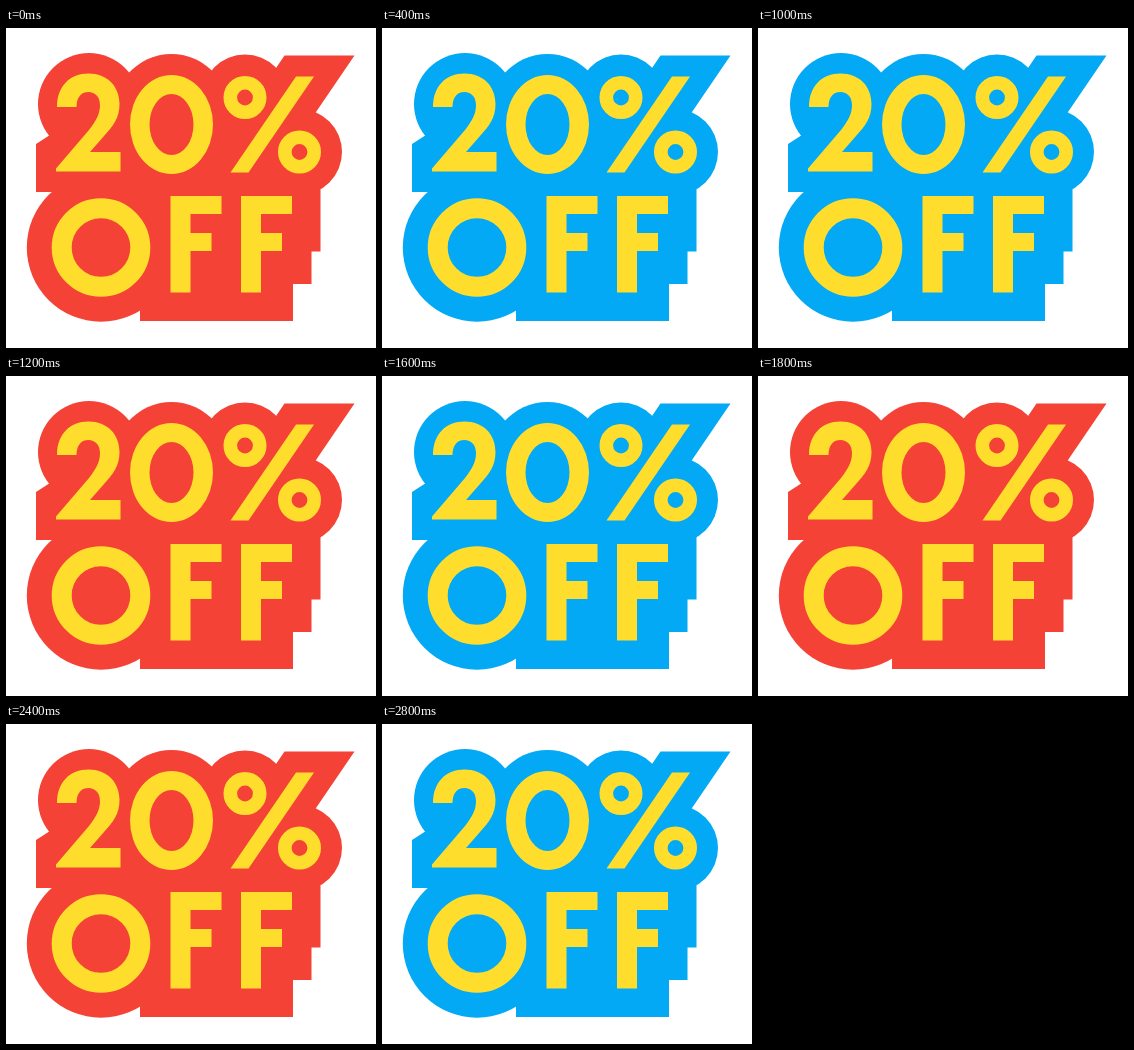
An HTML page without scripts for the animation above (3000 ms loop, 370 px wide and 320 px high).

```html
<!DOCTYPE html>
<html lang="en">
<head>
<meta charset="utf-8">
<title>20% OFF</title>
<style>
  html, body { margin: 0; width: 100%; height: 100%; overflow: hidden; background: #fff; }
  svg { display: block; width: 370px; height: 320px; }
  .backing { fill: #f44336; animation: flash 600ms step-end infinite; }
  .letters { fill: #ffdd2d; }
  .ring { fill: none; stroke: #ffdd2d; }
  @keyframes flash {
    0% { fill: #f44336; }
    33.333% { fill: #4caf50; }
    66.667% { fill: #03a9f4; }
  }
</style>
</head>
<body>
<svg viewBox="0 0 370 320" role="img" aria-label="20% OFF">
  <defs>
    <path id="F" d="M164.5 168H215.5V186H184.5V205H205.5V223H184.5V264.5H164.5Z"/>
  </defs>

  <g class="backing">
    <circle cx="83" cy="76" r="51"/>
    <ellipse cx="165.5" cy="96.5" rx="63" ry="70.5"/>
    <circle cx="239" cy="69.5" r="43"/>
    <circle cx="293" cy="124" r="43"/>
    <circle cx="95" cy="219.5" r="74.2"/>
    <path d="M30 164V116L44 107L83 76L165 96L239 69L269 41.5L278.5 27.5H348.5L310 84L293 124L314.5 150V223.5H305.5V256H287V293H134V219L60 164Z"/>
  </g>

  <g class="letters">
    <path d="M51 79C51 58 64 45.500 82.500 45.500C101 45.500 113.500 58 113.500 76C113.500 90 107 98 98 108L84 124H114.500V143.500H50V140.500L83 102C90 93 94 86 94 77C94 69 89 64 82.500 64C74.500 64 70.500 70 70.500 79Z"/>
    <path fill-rule="evenodd" d="M124 96.500a41.500 49.500 0 1 0 83 0a41.500 49.500 0 1 0 -83 0ZM143.500 96.500a22 30.500 0 1 1 44 0a22 30.500 0 1 1 -44 0Z"/>
    <path d="M290 48.500H308L242.500 144.500H224.500Z"/>
    <use href="#F"/>
    <use href="#F" x="70.500"/>
  </g>

  <g class="ring">
    <circle cx="239" cy="69.5" r="14.700" stroke-width="13.600"/>
    <circle cx="293.500" cy="124" r="14.700" stroke-width="13.600"/>
    <circle cx="95" cy="219.500" r="39.300" stroke-width="20"/>
  </g>
</svg>
</body>
</html>
```
